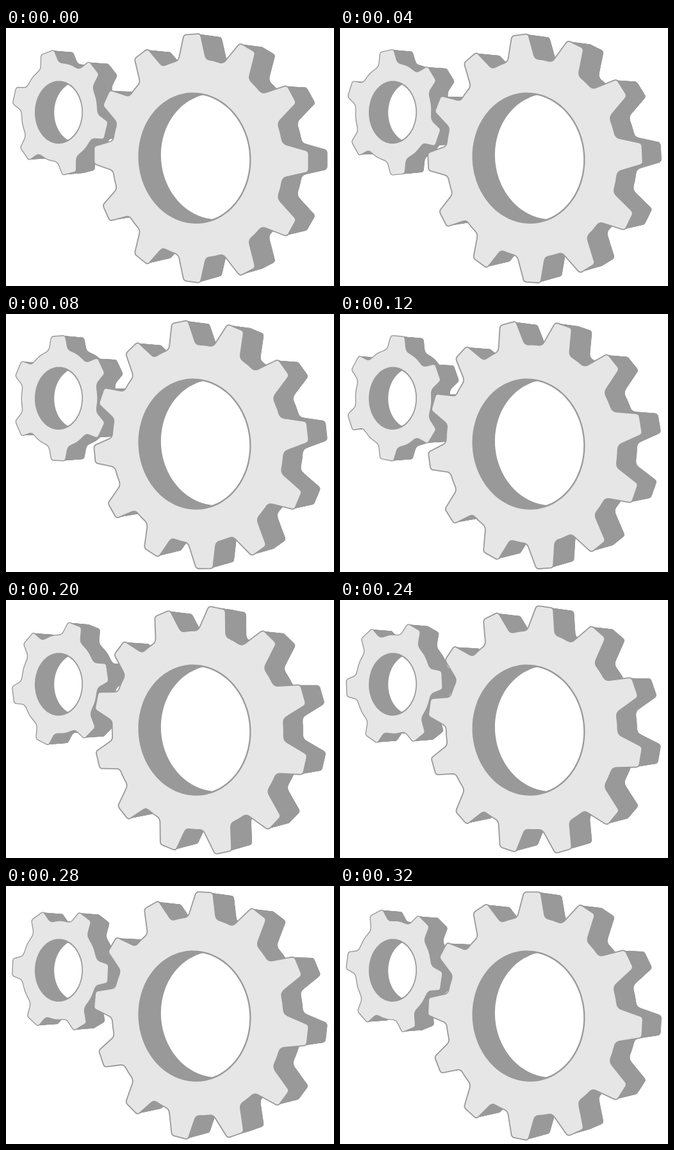
Recreate the animation shown at these times as an HTML page with a canvas. Size 512 by 402 pixels, loop 360 ms.

```html
<!DOCTYPE html>
<html lang="en">
<head>
<meta charset="utf-8">
<title>Gears</title>
<style>
  html, body { margin: 0; width: 100%; height: 100%; overflow: hidden; background: #fff; }
  canvas { display: block; }
</style>
</head>
<body>
<canvas id="stage" width="512" height="402"></canvas>
<script>
const ctx = document.getElementById('stage').getContext('2d');
const FACE = '#e6e6e6', SIDE = '#999';
const STEP_MS = 40, STEPS = 9, RAD = Math.PI / 180;
const TIP_CUT = 4, ROOT_CUT = 7;

// Angles are in degrees; each gear advances one tooth per loop.
const gears = [
  { x: -272.5, y: -73, teeth: 6, tip: 109.3, root: 86.5, tipAngle: 7.8, rootAngle: 14,
    hole: 55, depth: 0.805, rim: 2.8, start: -13.33, turn: 1 },
  { x: 0, y: 0, teeth: 12, tip: 192.5, root: 154, tipAngle: 4.2, rootAngle: 9,
    hole: 102, depth: 1, rim: 3.6, start: 0, turn: -1 }
];

// Perspective view of the gear plane; depth moves a point back along the axle.
function project([x, y], depth) {
  const w = 1 - 0.000454 * x + 0.037 * depth;
  return [290.4 + (0.861 * x + 34.8 * depth) / w,
          202.6 + (y + 0.026 * x - 2.5 * depth) / w];
}

function polar(gear, radius, degrees) {
  const a = degrees * RAD;
  return [gear.x + radius * Math.sin(a), gear.y - radius * Math.cos(a)];
}

function mix(a, b, t) {
  return [a[0] + (b[0] - a[0]) * t, a[1] + (b[1] - a[1]) * t];
}

function toward(from, to, distance) {
  const length = Math.hypot(to[0] - from[0], to[1] - from[1]);
  return mix(from, to, Math.min(0.5, distance / length));
}

function roundCorners(corners) {
  const n = corners.length;
  return corners.flatMap(({ p, cut }, i) => {
    const a = toward(p, corners[(i + n - 1) % n].p, cut);
    const b = toward(p, corners[(i + 1) % n].p, cut);
    return [0, 0.25, 0.5, 0.75, 1].map(t => mix(mix(a, p, t), mix(p, b, t), t));
  });
}

function outline(gear, angle) {
  const corners = [], pitch = 360 / gear.teeth;
  for (let i = 0; i < gear.teeth; i++) {
    const add = (radius, offset, cut) =>
      corners.push({ p: polar(gear, radius, angle + i * pitch + offset), cut });
    add(gear.root, -gear.rootAngle, ROOT_CUT);
    add(gear.tip, -gear.tipAngle, TIP_CUT);
    add(gear.tip, gear.tipAngle, TIP_CUT);
    add(gear.root, gear.rootAngle, ROOT_CUT);
    add(gear.root, pitch / 2, ROOT_CUT);
  }
  return roundCorners(corners);
}

function circle(gear, radius) {
  return Array.from({ length: 120 }, (_, i) => polar(gear, radius, i * 3));
}

function trace(points) {
  const path = new Path2D();
  points.forEach(p => path.lineTo(...p));
  path.closePath();
  return path;
}

function paint(path, color, lineWidth) {
  ctx.fillStyle = ctx.strokeStyle = color;
  ctx.fill(path);
  if (lineWidth) {
    ctx.lineWidth = lineWidth;
    ctx.stroke(path);
  }
}

function drawGear(gear, step) {
  const shape = outline(gear, gear.start + gear.turn * step * 360 / gear.teeth / STEPS);
  const at = (points, depth) => points.map(p => project(p, depth));
  const front = at(shape, 0), back = at(shape, gear.depth);

  paint(trace(back), SIDE, 1);
  front.forEach((p, i) => {
    const j = (i + 1) % front.length;
    paint(trace([p, front[j], back[j], back[i]]), SIDE, 1);
  });
  paint(trace(front), SIDE, gear.rim);
  paint(trace(front), FACE);

  paint(trace(at(circle(gear, gear.hole), 0)), SIDE);
  ctx.save();
  ctx.clip(trace(at(circle(gear, gear.hole - 2.4), 0)));
  paint(trace(at(circle(gear, gear.hole - 0.5), gear.depth)), '#fff');
  ctx.restore();
}

let shown = -1;
function frame(now) {
  const step = Math.floor(now / STEP_MS) % STEPS;
  if (step !== shown) {
    shown = step;
    ctx.fillStyle = '#fff';
    ctx.fillRect(0, 0, 512, 402);
    gears.forEach(gear => drawGear(gear, step));
  }
  requestAnimationFrame(time => frame(Math.max(0, time - origin)));
}

ctx.lineJoin = 'round';
const origin = performance.now();
frame(0);
</script>
</body>
</html>
```
